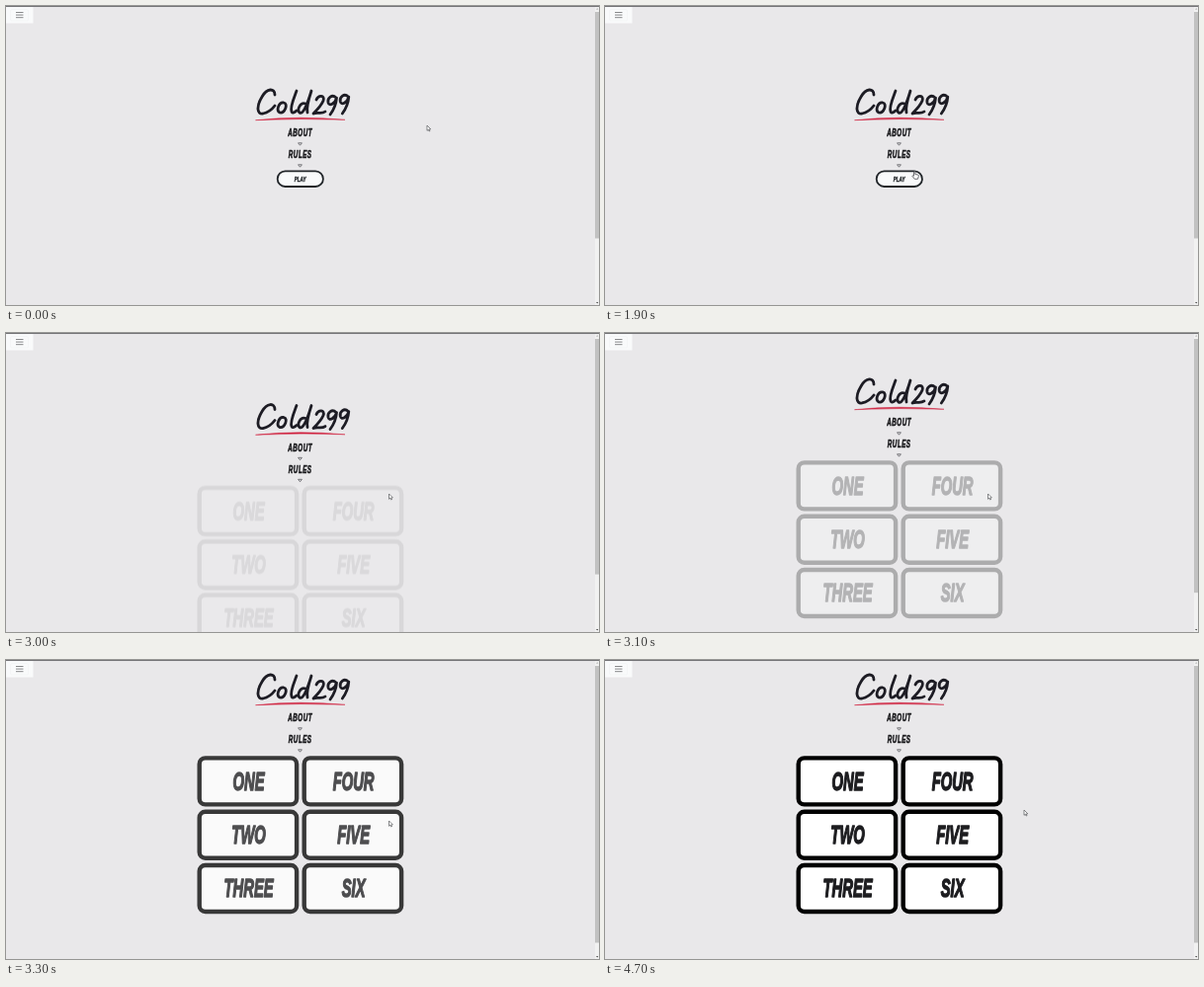
An HTML page for the animation above (5 s loop, 600 by 303 pixels).

```html
<!DOCTYPE html>
<html lang="en">
<head>
<meta charset="utf-8">
<title>Game menu</title>
<style>
  html, body { margin: 0; width: 100%; height: 100%; overflow: hidden; background: #e9e8ea; }
  svg { display: block; width: 100vw; height: 100vh; }
  text {
    font-family: "Liberation Sans", Arial, sans-serif;
    font-weight: 700;
    font-style: italic;
    text-anchor: middle;
    stroke-width: .06em;
    stroke-linejoin: round;
  }
  .menu { letter-spacing: .08em; }
</style>
</head>
<body>
<svg id="stage" viewBox="0 0 600 303" xmlns="http://www.w3.org/2000/svg">
  <rect width="600" height="303" fill="#e9e8ea"/>

  <g id="page">
    <g role="img" aria-label="Cold299" fill="none" stroke="#1d1c24" stroke-width="2.8"
       stroke-linecap="round" stroke-linejoin="round">
      <path d="M272 90C272 83 264 83 259 92C253 102 254 110 260 109C265 108 269 105 272 101"/>
      <path d="M281 98C276 97 273 106 277 108C282 109 286 99 281 98"/>
      <path d="M294 86C291 94 287 103 289 107C290 109 292 108 294 106"/>
      <path d="M303 99C298 97 294 105 297 108C300 110 304 103 309 86C306 95 304 104 305 108"/>
      <path d="M314 95C316 90 323 90 321 96C319 101 314 106 311 109C315 107 319 110 323 107"/>
      <path id="nine" d="M334 93C330 89 325 93 326 98C327 102 333 99 334.5 93C334 100 331 106 328 110"/>
      <use href="#nine" x="12.3" y="-1"/>
    </g>
    <path d="M252.5 115.7Q296 111 343 115.3Q298 113.7 252.5 115.7Z" fill="#cf1f3c" stroke="#cf1f3c" stroke-width=".5"/>
    <g id="links"></g>
    <g id="play">
      <rect id="pill" x="274.7" y="167.4" width="46.2" height="15.6" rx="7.8" stroke="#212529"/>
    </g>
    <g id="cards"></g>
  </g>

  <rect width="600" height="1" fill="#77777a"/>
  <rect y="1" width="27.5" height="16.5" fill="#f9fafb"/>
  <rect x="4.5" y="3.5" width="18" height="11.5" rx="1.5" fill="none" stroke="#f0f1f3" stroke-width=".6"/>
  <path d="M10 6.5H17.5M10 9.1H17.5M10 11.7H17.5" stroke="#7b7c7e" stroke-width=".9"/>

  <rect x="596" y="1" width="4" height="302" fill="#f1f1f1"/>
  <rect id="thumb" x="596" y="6" width="4" fill="#c1c1c1"/>
  <path d="M597 3.6L598.2 2.2L599.4 3.6Z" fill="#a3a3a3"/>
  <path d="M597 300L598.2 301.4L599.4 300Z" fill="#505050"/>

  <g id="cursor" stroke-linejoin="round">
    <path id="arrow" d="M0 0V5.3L1.3 4.2L2.1 6L3 5.6L2.2 3.9L3.8 3.8Z" fill="#fff" stroke="#55565a" stroke-width=".7"/>
    <path id="hand" d="M0 .6Q.7 -.5 1.4 .6V3L4.3 3.6Q5 4 4.8 5L4 7.8H.8L-1.6 4.8Q-1.4 3.8 0 4.7Z"
          fill="#fff" stroke="#4a4b50" stroke-width=".8"/>
  </g>
</svg>

<script>
const LOOP = 5000, STEP = 100;
const NS = "http://www.w3.org/2000/svg";
const $ = id => document.getElementById(id);

function add(parent, tag, attrs, label) {
  const el = document.createElementNS(NS, tag);
  for (const key in attrs) el.setAttribute(key, attrs[key]);
  if (label) el.textContent = label;
  parent.appendChild(el);
  return el;
}

// All lettering shares one condensed style.
function word(parent, label, x, y, size, color, cls = "") {
  return add(parent, "text", {
    transform: `translate(${x} ${y}) scale(.58 1)`,
    "font-size": size, fill: color, stroke: color, class: cls
  }, label);
}

["ABOUT", "RULES"].forEach((label, i) => {
  const y = 132 + i * 22;
  word($("links"), label, 297.7, y, 10.8, "#1a1a1d", "menu");
  add($("links"), "path", {
    d: `M295.6 ${y + 6.8}H299.4L297.5 ${y + 9.2}Z`,
    fill: "#f4f4f5", stroke: "#55555a", "stroke-width": .8
  });
});

const playText = word($("play"), "PLAY", 297.7, 177.7, 7.8, "#212529");

["ONE", "TWO", "THREE", "FOUR", "FIVE", "SIX"].forEach((label, i) => {
  const x = 195.7 + Math.floor(i / 3) * 106, y = 169.4 + (i % 3) * 54.3;
  add($("cards"), "rect", {
    x, y, width: 98.4, height: 47, rx: 6,
    fill: "#fff", stroke: "#000", "stroke-width": 4.4
  });
  word($("cards"), label, x + 49.9, y + 32.4, 25.5, "#1c1c1f");
});

const clamp = v => Math.min(1, Math.max(0, v));
const mix = (a, b, u) => a + (b - a) * u;
const swing = (t, start, length) => .5 - Math.cos(Math.PI * clamp((t - start) / length)) / 2;
const blend = (a, b, u) => `rgb(${a.map((v, i) => Math.round(mix(v, b[i], u)))})`;

// Pointer stops: time, x, y
const stops = [
  [0, 426, 121], [800, 426, 121], [1100, 425, 120.6], [1200, 425, 120.6],
  [1400, 411, 126], [1600, 366, 145], [1800, 325, 160], [1900, 312.5, 167.5],
  [2100, 308.3, 171.3], [2600, 308.3, 171.3], [2700, 334, 170], [2800, 370, 168],
  [2900, 387.5, 163], [4000, 387.5, 163], [4100, 398, 160], [4300, 424, 152], [LOOP, 424, 152]
];

function pointer(t) {
  const i = stops.findIndex(s => s[0] > t);
  const a = stops[i - 1], b = stops[i], u = (t - a[0]) / (b[0] - a[0]);
  return [mix(a[1], b[1], u), mix(a[2], b[2], u)];
}

function draw(t) {
  const rise = swing(t, 2889, 400);
  $("page").setAttribute("transform", `translate(0 ${-70 * rise})`);
  $("thumb").setAttribute("height", mix(229.5, 280.5, rise));

  const hover = clamp((t - 1900) / 150);
  const ink = blend([33, 37, 41], [255, 255, 255], hover);
  $("pill").setAttribute("fill", blend([249, 250, 251], [211, 214, 217], hover));
  $("pill").setAttribute("stroke-width", t < 2300 ? 1.8 : 2.8);
  playText.setAttribute("fill", ink);
  playText.setAttribute("stroke", ink);
  $("play").setAttribute("opacity", 1 - swing(t, 2295, 600));
  $("cards").setAttribute("opacity", swing(t, 2895, 600));

  const [x, y] = pointer(t), over = t >= 1900 && t < 2700;
  $("cursor").setAttribute("transform", `translate(${x} ${y})`);
  $("hand").setAttribute("visibility", over ? "visible" : "hidden");
  $("arrow").setAttribute("visibility", over ? "hidden" : "visible");
}

const begin = performance.now();
function tick() {
  const t = (performance.now() - begin) % LOOP;
  draw(Math.floor(t / STEP) * STEP);
  requestAnimationFrame(tick);
}
tick();
</script>
</body>
</html>
```
